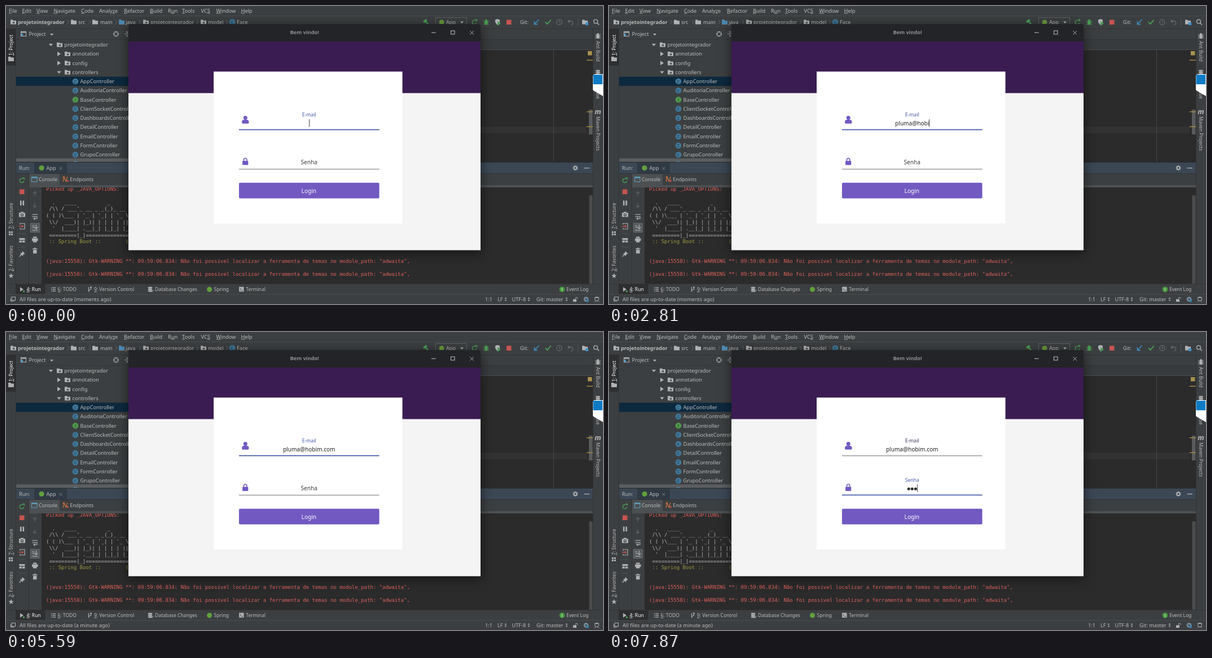
Write an HTML page with a canvas that moves like this. It is 1058 px wide and 529 px high and loops after 8 s.

```html
<!DOCTYPE html>
<html lang="pt">
<head>
<meta charset="utf-8">
<title>Login</title>
<style>
html, body { margin: 0; width: 1058px; height: 529px; overflow: hidden; background: #3c3f41; }
canvas { display: block; }
</style>
</head>
<body>
<canvas id="stage" width="1058" height="529"></canvas>
<script>
const W = 1058, H = 529, LOOP = 8000;
const SANS = '"Noto Sans", "Open Sans", sans-serif';
const MONO = '"DejaVu Sans Mono", monospace';
const PANEL = '#3c3f41', EDITOR = '#2b2b2b', INK = '#bbbbbb', ICON = '#afb1b3', EDGE = '#323232';
const HEADER = '#3b4754', TAB = '#4c5052';
const GREEN = '#499c54', RED = '#c75450', BLUE = '#4059a9', PURPLE = '#7159c1';

const stage = document.getElementById('stage').getContext('2d');
const backdrop = document.createElement('canvas');
backdrop.width = W;
backdrop.height = H;
let g = backdrop.getContext('2d');

function rect(x, y, w, h, color) {
  g.fillStyle = color;
  g.fillRect(x, y, w, h);
}

function frame(x, y, w, h, color, width = 1) {
  g.strokeStyle = color;
  g.lineWidth = width;
  g.strokeRect(x, y, w, h);
}

function disc(x, y, r, color) {
  g.fillStyle = color;
  g.beginPath();
  g.arc(x, y, r, 0, Math.PI * 2);
  g.fill();
}

function ring(x, y, r, color, width = 1.2, from = 0, to = Math.PI * 2) {
  g.strokeStyle = color;
  g.lineWidth = width;
  g.beginPath();
  g.arc(x, y, r, from, to);
  g.stroke();
}

function round(x, y, w, h, r, color) {
  g.fillStyle = color;
  g.beginPath();
  g.roundRect(x, y, w, h, r);
  g.fill();
}

function trace(points) {
  g.beginPath();
  for (let i = 0; i < points.length; i += 2) g.lineTo(points[i], points[i + 1]);
}

function poly(color, ...points) {
  trace(points);
  g.fillStyle = color;
  g.fill();
}

function line(color, width, ...points) {
  trace(points);
  g.strokeStyle = color;
  g.lineWidth = width;
  g.stroke();
}

// y is the middle of the capitals; "&" underlines the letter after it
function text(str, x, y, { size = 9.2, color = INK, weight = 400, font = SANS, align = 'left' } = {}) {
  const mark = str.indexOf('&');
  const plain = str.replace('&', '');
  const base = y + size * 0.36;
  g.font = `${weight} ${size}px ${font}`;
  g.textAlign = align;
  g.fillStyle = color;
  g.fillText(plain, x, base);
  if (mark >= 0) {
    const left = g.measureText(plain.slice(0, mark)).width;
    g.fillRect(x + left, base + 1, g.measureText(plain[mark]).width, 0.8);
  }
}

function turned(str, x, y, angle, opts) {
  g.save();
  g.translate(x, y);
  g.rotate(angle * Math.PI / 180);
  text(str, 0, 0, { size: 8.52, ...opts });
  g.restore();
}

function folder(x, y, dot) {
  poly(ICON, x, y - 4, x + 4, y - 4, x + 5.3, y - 2.6, x + 10, y - 2.6, x + 10, y + 4, x, y + 4);
  if (dot) disc(x + 5.5, y + 1, 1.6, PANEL);
}

function badge(letter, x, y, color) {
  disc(x, y, 5.3, color);
  text(letter, x, y, { size: 7.6, align: 'center', color: 'rgba(20,24,28,.75)' });
}

function down(x, y, s = 3, color = ICON) {
  poly(color, x - s, y - s / 2, x + s, y - s / 2, x, y + s * 0.7);
}

function cross(x, y, s, color, width = 1) {
  line(color, width, x - s, y - s, x + s, y + s);
  line(color, width, x - s, y + s, x + s, y - s);
}

function reload(x, y) {
  ring(x, y + 0.5, 3.6, GREEN, 1.5, 0.2, 5.2);
  poly(GREEN, x + 0.8, y - 5, x + 5, y - 5, x + 5, y - 0.6);
}

function bug(x, y, color) {
  g.fillStyle = color;
  g.beginPath();
  g.ellipse(x, y + 1, 2.8, 4, 0, 0, 7);
  g.fill();
  disc(x, y - 3.4, 1.7, color);
  for (const d of [-2, 1, 4]) line(color, 0.9, x - 5, y + d, x + 5, y + d);
}

function gear(x, y, color, hole) {
  for (let i = 0; i < 4; i++) {
    const a = i * Math.PI / 4, c = Math.cos(a) * 4.6, s = Math.sin(a) * 4.6;
    line(color, 1.6, x - c, y - s, x + c, y + s);
  }
  disc(x, y, 3.4, color);
  disc(x, y, 1.7, hole);
}

function cylinder(x, y) {
  for (const d of [-3, 0, 3]) {
    g.fillStyle = ICON;
    g.beginPath();
    g.ellipse(x, y + d, 4, 1.4, 0, 0, 7);
    g.fill();
  }
}

function arrow(x, y, dir, color) {
  line(color, 1.2, x, y - 4 * dir, x, y + 3.5 * dir);
  line(color, 1.2, x - 3, y + 0.5 * dir, x, y + 3.5 * dir, x + 3, y + 0.5 * dir);
}

function menuBar() {
  const items = [['&File', 5], ['&Edit', 28.5], ['&View', 54], ['&Navigate', 84.5], ['&Code', 133], ['Analy&ze', 165],
    ['&Refactor', 209], ['&Build', 255], ['R&un', 287], ['&Tools', 312], ['VC&S', 345.5], ['&Window', 372.5], ['&Help', 416.5]];
  for (const [name, x] of items) text(name, x, 8.3);
  rect(0, 17, W, 1, '#4a4d4f');
}

function navBar() {
  folder(8, 28.5, true);
  text('projetointegrador', 21, 28.5, { weight: 700 });
  const crumbs = [['src', 115, 128], ['main', 153, 167], ['java', 200, 212], ['projetointegrador', 243, 256], ['model', 345, 358]];
  for (const [name, fx, tx] of crumbs) {
    folder(fx, 28.5, fx > 240);
    text(name, tx, 28.5);
  }
  poly('#4a88b0', 200, 24.5, 204, 24.5, 205.3, 26, 210, 26, 210, 32.5, 200, 32.5);
  for (const x of [109, 147, 194, 236, 338, 390]) line('#6b6e70', 0.9, x, 25, x + 3, 28.5, x, 32);
  badge('C', 401, 28.5, '#40789a');
  text('Face', 409, 28.5);

  poly(GREEN, 739, 27, 744, 23, 747, 26, 745, 27.5, 750, 32.5, 748.5, 34, 743, 29, 741, 30);
  frame(761.5, 20.5, 55, 16, '#5e6163');
  disc(772, 29, 4.5, '#6a9a3d');
  text('App', 780, 28.7);
  down(808, 29);
  reload(830, 28.5);
  bug(851, 28.5, GREEN);
  poly(ICON, 867, 24.5, 871, 23, 875, 24.5, 875, 29, 871, 34, 867, 29);
  poly(GREEN, 871, 27, 877, 31, 871, 35);
  rect(887, 24.5, 8.5, 8.5, RED);
  text('Git:', 911, 28.5);
  line('#3f93c7', 1.5, 944.5, 24, 936.5, 32.5);
  line('#3f93c7', 1.5, 936.5, 27, 936.5, 32.5, 942, 32.5);
  line(GREEN, 2, 956, 28.5, 959.5, 32, 965.5, 24.5);
  ring(980.5, 28.5, 4.7, '#67696b');
  line('#67696b', 1, 980.5, 25.5, 980.5, 29, 983, 29);
  ring(1001, 30, 3.6, '#67696b', 1.3, -2.4, 1.6);
  poly('#67696b', 996, 24, 996, 29.5, 1001, 28);
  rect(1013, 21, 1, 15, '#515456');
  folder(1021, 28.5);
  rect(1027, 29, 5, 5, '#3f93c7');
  ring(1045, 27.5, 3.4, ICON, 1.4);
  line(ICON, 1.5, 1047.5, 30, 1051, 33.5);
  rect(0, 40, W, 1, EDGE);
}

function sideStripes() {
  rect(0, 41, 17, 65, '#2d2f31');
  rect(17, 41, 1, 453, EDGE);
  turned('&1: Project', 9, 88, -90, { color: '#ffffff' });
  folder(4, 94);
  turned('&7: Structure', 9, 396, -90);
  for (const [x, y] of [[5, 400], [9, 400], [9, 404], [5, 404]]) rect(x, y, 3, 3, ICON);
  turned('&2: Favorites', 9, 471, -90);
  const star = [];
  for (let i = 0; i < 10; i++) {
    const a = -Math.PI / 2 + i * Math.PI / 5, r = i % 2 ? 2 : 5;
    star.push(9 + Math.cos(a) * r, 479 + Math.sin(a) * r);
  }
  poly(ICON, ...star);

  rect(1040, 41, 1, 453, EDGE);
  bug(1049, 53, ICON);
  turned('Ant Build', 1049, 62, 90);
  cylinder(1049, 118);
  turned('Database', 1049, 127, 90);
  poly('#ffffff', 1039, 125, 1042, 121, 1058, 121, 1058, 160, 1041, 150, 1039, 147);
  rect(1040.5, 122, 16.5, 17, '#0e7bc4');
  text('m', 1049, 187, { size: 12.5, weight: 'italic 700', align: 'center' });
  turned('Maven Projects', 1049, 196, 90);
}

function projectTree() {
  frame(26.5, 45.5, 9, 8, ICON);
  rect(26, 45, 10, 2.5, ICON);
  rect(27, 49, 3, 4, '#3f93c7');
  text('Project', 40.5, 50);
  down(81, 50.5);
  ring(195, 49.7, 4, ICON);
  line(ICON, 1, 195, 45, 195, 48);
  line(ICON, 1, 195, 51.5, 195, 54.5);
  line(ICON, 1, 190, 49.7, 193, 49.7);
  line(ICON, 1, 197, 49.7, 200, 49.7);
  line(ICON, 1, 210, 49.7, 219, 49.7);
  down(214.5, 46.5, 2);
  poly(ICON, 212.5, 54, 216.5, 54, 214.5, 51.5);
  rect(18, 59, 199, 1, '#35383a');

  g.save();
  g.beginPath();
  g.rect(18, 60, 200, 217);
  g.clip();
  rect(18, 125.5, 200, 16.3, '#0d293e');
  const top = 68.7, pitch = 16.27;
  down(79.5, top, 3.6);
  folder(90, top, true);
  text('projetointegrador', 103.5, top);
  ['annotation', 'config', 'controllers'].forEach((name, i) => {
    const y = top + pitch * (i + 1);
    if (i === 2) down(94, y, 3.6);
    else poly(ICON, 91, y - 4, 97, y, 91, y + 4);
    folder(104, y, true);
    text(name, 117.5, y);
  });
  ['App', 'Auditoria', 'Base', 'ClientSocket', 'Dashboards', 'Detail', 'Email', 'Form', 'Grupo', 'Login'].forEach((name, i) => {
    const y = top + pitch * (i + 4), base = name === 'Base';
    badge(base ? 'I' : 'C', 123, y, base ? '#4f9a4a' : '#40789a');
    text(name + 'Controller', 131.5, y);
  });
  rect(18, 270.5, 200, 6, 'rgba(130,132,134,.45)');
  g.restore();
}

function editor() {
  rect(841, 59, 199, 1, EDGE);
  rect(841, 60, 199, 17, '#383b3d');
  rect(841, 77, 199, 1, '#4b4e50');
  rect(217, 78, 823, 199, EDITOR);
  rect(841, 214, 188, 12, '#323232');
  rect(970, 78, 1, 199, '#454545');
  rect(1031, 80, 7.5, 7.5, '#a8924f');
  rect(1033, 184, 6.5, 44, '#595b5c');
  for (const y of [95.5, 187, 213.5]) rect(1029, y, 11, 1.5, '#a58a3f');
}

function runHeader() {
  rect(18, 277, 1022, 1, '#2b2d2e');
  rect(18, 278, 1022, 19, HEADER);
  text('Run:', 23, 287.7);
  rect(50, 278, 58, 19, 'rgba(0,0,0,.18)');
  disc(63, 287.5, 4.6, '#62a03c');
  text('App', 71.5, 287.7);
  cross(97, 288.3, 2.3, '#7d858c');
  gear(1009, 287.5, ICON, HEADER);
  rect(1024.5, 287, 9.5, 1.3, ICON);
  rect(18, 297, 1022, 1, EDGE);

  // the selected tab runs on into a strip under the whole row
  rect(40.5, 298, 54.5, 20, TAB);
  rect(40.5, 318, 999.5, 4, TAB);
  frame(45.5, 303.5, 9.5, 8.5, '#5f9fc0');
  rect(45, 303, 10.5, 2.5, '#5f9fc0');
  text('Console', 58, 307.8, { size: 8.9 });
  line('#c4703f', 1.3, 101, 312, 103, 304, 106, 311, 109, 303);
  disc(102.5, 304, 1.8, '#c4703f');
  disc(109, 310.5, 1.8, RED);
  text('Endpoints', 113.3, 307.8, { size: 8.9 });
}

function runIcons() {
  rect(40, 298, 1, 195, EDGE);
  reload(28, 309.5);
  rect(24, 325.5, 8.5, 8.5, RED);
  rect(25, 345.5, 2.6, 8.5, ICON);
  rect(29.5, 345.5, 2.6, 8.5, ICON);
  rect(23, 367, 11, 7.5, ICON);
  rect(26, 365.5, 5, 2, ICON);
  ring(28.5, 370.8, 2, PANEL);
  line(ICON, 1.2, 25, 388, 25, 386, 33, 386, 33, 396, 25, 396, 25, 394);
  line(RED, 1.4, 23, 391, 30, 391);
  poly(RED, 28, 388.5, 31.5, 391, 28, 393.5);
  rect(23.5, 412, 10, 3.3, ICON);
  rect(23.5, 416.5, 4.5, 3.3, ICON);
  rect(29, 416.5, 4.5, 3.3, ICON);
  rect(23, 403.5, 11, 1, '#515456');
  rect(23, 427.5, 11, 1, '#515456');
  poly(ICON, 29, 435, 34, 440, 31, 440.5, 29.5, 444, 25, 439.5, 28.5, 438);
  line(ICON, 1.2, 27, 441.5, 23.5, 445);

  arrow(51, 333, -1, '#616466');
  arrow(51, 354, 1, '#616466');
  rect(46.5, 369.5, 9.5, 1.2, ICON);
  line(ICON, 1.2, 46.5, 373.8, 55, 373.8, 55, 377.5, 50, 377.5);
  poly(ICON, 51.5, 375, 48, 377.5, 51.5, 380);
  rect(43, 385.5, 16.5, 16.5, '#54585b');
  frame(43.5, 386, 15.5, 15.5, '#6c7073');
  rect(46.5, 389.5, 4, 1.2, ICON);
  rect(46.5, 392.5, 4, 1.2, ICON);
  rect(46.5, 397.5, 9.5, 1.2, ICON);
  arrow(53.5, 392, 1, ICON);
  rect(46, 412.5, 10.5, 4.5, ICON);
  rect(48, 409.5, 6.5, 2.3, ICON);
  rect(48, 416, 6.5, 3.5, ICON);
  rect(47, 430.5, 8.5, 1.4, ICON);
  rect(49.5, 429.2, 3.5, 1.5, ICON);
  rect(48, 432.8, 6.5, 6.5, ICON);
}

function consoleText() {
  rect(63, 322, 977, 171, EDITOR);
  rect(1033.5, 336, 6, 157, '#4a4c4d');
  const warning = '(java:15558): Gtk-WARNING **: 09:59:06.834: Não foi possível localizar a ferramenta de temas no module_path: "adwaita",';
  const rows = [
    'Picked up _JAVA_OPTIONS:', '',
    String.raw`  .   ____          _            __ _ _`,
    String.raw` /\\ / ___'_ __ _ _(_)_ __  __ _ \ \ \ \ `,
    String.raw`( ( )\___ | '_ | '_| | '_ \/ _  | \ \ \ \ `,
    String.raw` \\/  ___)| |_)| | | | | || (_| |  ) ) ) )`,
    String.raw`  '  |____| .__|_| |_|_| |_\__, | / / / /`,
    ' =========|_|==============|___/=/_/_/_/',
    ' :: Spring Boot ::        (v2.0.5.RELEASE)', '', '', warning, '', warning];
  g.save();
  g.beginPath();
  g.rect(63, 322, 970, 171);
  g.clip();
  rows.forEach((row, i) => {
    const color = i === 0 || i > 8 ? '#e0625c' : i === 8 ? '#a09c45' : INK;
    text(row, 71, 325.2 + i * 11.617, { size: 9.01, font: MONO, color });
  });
  g.restore();
}

function bottomBars() {
  const small = { size: 8.52 };
  rect(0, 493, W, 1, EDGE);
  rect(17, 494, 52.5, 18, '#2d2f31');
  poly(ICON, 25, 499, 31, 503, 25, 507);
  rect(30, 505, 3, 3, GREEN);
  text('&4: Run', 36.5, 503, { size: 8.52, color: '#ffffff' });
  for (const y of [499.5, 502.5, 505.5]) {
    rect(80, y, 1.5, 1.3, ICON);
    rect(82.5, y, 5.5, 1.3, ICON);
  }
  text('&6: TODO', 91.5, 503, small);
  line(ICON, 1.2, 146.5, 499, 146.5, 507.5);
  line(ICON, 1.2, 146.5, 505, 150.5, 503, 150.5, 499);
  disc(150.5, 499.5, 1.4, ICON);
  text('&9: Version Control', 156, 503, small);
  cylinder(255.5, 503);
  line(ICON, 1, 258, 508, 262, 504);
  text('Database Changes', 264, 503, small);
  disc(360.5, 503, 4.5, '#62a03c');
  text('Spring', 368.5, 503, small);
  rect(413, 498.5, 8.5, 8.5, ICON);
  line(PANEL, 1, 414.5, 501, 416.5, 502.8, 414.5, 504.6);
  line(PANEL, 1, 417, 505, 420, 505);
  text('Terminal', 425, 503, small);
  disc(985.5, 503, 4.8, '#499c3f');
  text('1', 985.5, 503, { size: 7, color: '#ffffff', align: 'center' });
  text('Event Log', 993, 503, small);

  rect(0, 511.5, W, 1, '#4a4d4f');
  frame(10, 516.5, 6.5, 6, ICON);
  line(ICON, 1, 8.5, 518.5, 8.5, 524, 14, 524);
  text('1:1', 849, 520.5);
  for (const [name, x, end] of [['LF', 871, 885.5], ['UTF-8', 896.5, 926.5], ['Git: master', 940, 993.5]]) {
    text(name, x, 520.5);
    poly(ICON, end - 2, 519.5, end + 2, 519.5, end, 517);
    poly(ICON, end - 2, 521.5, end + 2, 521.5, end, 524);
  }
  rect(1005, 520.5, 6, 4.5, ICON);
  ring(1011, 519.5, 2, ICON, 1.1, Math.PI, 0);
  gear(1028, 520.5, '#7f98aa', PANEL);
  disc(1030.5, 523, 2.6, '#3f7fa6');
  ring(1047, 520, 3.6, ICON, 1);
  rect(1043, 517, 8, 1.1, ICON);
  line(ICON, 1, 1043, 525.5, 1045, 523.5, 1049, 523.5, 1051, 525.5);
}

function loginWindow() {
  g.save();
  g.shadowColor = 'rgba(0,0,0,.55)';
  g.shadowBlur = 20;
  g.shadowOffsetY = 4;
  round(217, 32, 624, 401.5, [3, 3, 0, 0], '#222427');
  g.restore();
  text('Bem vindo!', 529, 47, { weight: 700, color: '#8d9196', align: 'center' });
  rect(754, 46.7, 7.5, 1.1, '#b4b7ba');
  frame(788.5, 44, 6.5, 6, '#b4b7ba', 1.1);
  cross(825.6, 47.5, 3.2, '#b4b7ba');
  rect(217, 63, 624, 92, '#3a1c52');
  rect(217, 154.6, 624, 278.9, '#f4f4f4');
  rect(368, 116.4, 334.5, 269.6, '#ffffff');

  disc(424.2, 198.6, 3.5, PURPLE);
  round(418, 202, 12.5, 6.8, [4, 4, 2, 2], PURPLE);
  round(419, 275, 10.2, 7.2, 1, PURPLE);
  line(PURPLE, 1.6, 421.4, 275.5, 421.4, 273);
  line(PURPLE, 1.6, 426.8, 275.5, 426.8, 273);
  ring(424.1, 273, 2.7, PURPLE, 1.6, Math.PI, 0);

  round(412.9, 313.7, 248.6, 27.9, 2, PURPLE);
  text('Login', 536.8, 328, { size: 10.07, color: '#ffffff', align: 'center' });
}

rect(0, 0, W, H, PANEL);
for (const part of [menuBar, navBar, sideStripes, projectTree, editor, runHeader, consoleText, runIcons, bottomBars, loginWindow]) part();

const MAIL = 'pluma@hobim.com';
const MAIL_KEYS = [1020, 1160, 1220, 1360, 1470, 1890, 2470, 2610, 2650, 2810, 2900, 3140, 3210, 3350, 3430];
const PASS_KEYS = [7080, 7400, 7870];
const CARET_OFF = [[200, 660], [2390, 2470], [3930, 4420], [4920, 5110], [5590, 6090], [7000, 7080]];
const SWITCH = 6520, MID = 537.2, BODY = 10.07;

const typed = (keys, t) => keys.filter(k => t >= k).length;

function mix(a, b, p) {
  return `rgb(${a.map((v, i) => Math.round(v + (b[i] - v) * p)).join()})`;
}

function underline(y, active) {
  rect(412.9, y + 0.3, 248.6, 0.8, '#4d4d4d');
  if (active > 0) rect(MID - 124.3 * active, y - 0.4, 248.6 * active, 1.55, BLUE);
}

function caret(x, y, h) {
  rect(x, y, 0.85, h, '#2a2a2a');
}

function draw(t) {
  g = stage;
  g.drawImage(backdrop, 0, 0);
  text(`All files are up-to-date (${t < 3990 ? 'moments' : 'a minute'} ago)`, 24, 520.5);

  const onPass = t >= SWITCH;
  const blink = !CARET_OFF.some(([a, b]) => t >= a && t < b);

  text('E-mail', MID, 193, { size: BODY * 0.85, color: onPass ? '#33365a' : BLUE, align: 'center' });
  const mail = MAIL.slice(0, typed(MAIL_KEYS, t));
  text(mail, MID, 208.2, { size: BODY, color: '#222222', align: 'center' });
  const mailWidth = g.measureText(mail).width;
  underline(219.1, onPass ? 0 : 1);
  if (!onPass && blink) caret(MID + mailWidth / 2 - 0.1, 201, 13.5);

  // the label floats up in four steps
  const step = onPass ? Math.min(1, (Math.floor((t - SWITCH) / 50) + 1) / 4) : 0;
  const p = step * step * (3 - 2 * step);
  text('Senha', MID, 277.6 - 15 * p, { size: BODY * (1 - 0.15 * p), color: mix([58, 58, 58], [64, 89, 169], p), align: 'center' });
  underline(289, p);
  if (onPass) {
    const n = typed(PASS_KEYS, t);
    for (let i = 0; i < n; i++) disc(MID + 3 + 6 * i - 3 * n, 278.4, 2.5, '#2a2a2a');
    if (blink) caret(MID + 3 * n - 0.1, 270.5, 13.5);
  }
}

const start = performance.now();
function tick() {
  draw((performance.now() - start) % LOOP);
  requestAnimationFrame(tick);
}
tick();
</script>
</body>
</html>
```
